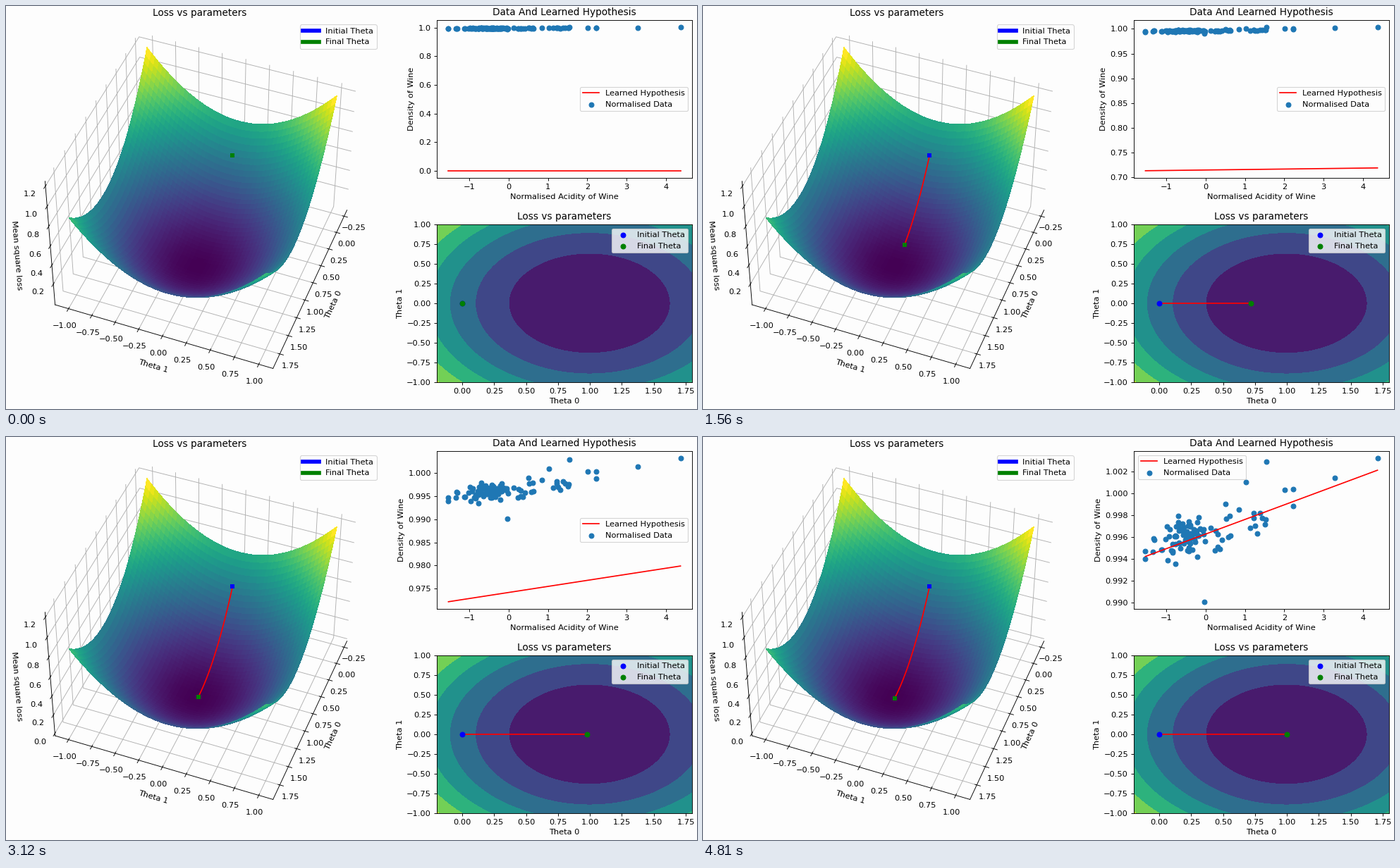
Recreate the animation shown at these times as a matplotlib script. Size 980 px wide and 572 px high, loop 4.94 s.

```python
import numpy as np
import matplotlib.pyplot as plt
from matplotlib.animation import FuncAnimation
from matplotlib.lines import Line2D

W, H = 980, 572
DPI = W / 12
FRAMES, INTERVAL = 38, 130
BEST = np.array([0.99662, 0.00134])  # least squares optimum
RATE = 0.1

plt.rcParams.update({
    "font.family": "DejaVu Sans",
    "figure.facecolor": "#fdfdfd",
    "axes.facecolor": "#fdfdfd",
})


def loss(t0, t1):
    return 0.5 * ((t0 - BEST[0]) ** 2 + (t1 - BEST[1]) ** 2)


def theta(n):
    """Parameters after n steps of gradient descent from the origin."""
    return BEST * (1 - (1 - RATE) ** np.asarray(n, float)[..., None])


def step_count(i):
    """Iterations per frame grow from one to two, then three."""
    return i + max(0, i - 16) + max(0, i - 20)


def make_data():
    """A dense core, a wide spread around the trend and a few outliers."""
    rng = np.random.default_rng(7)
    core = rng.normal(-0.42, 0.27, 56)
    wide = rng.uniform(-1.42, 1.6, 42)
    y_core = 0.9968 + 0.001 * core + rng.normal(0, 0.0008, core.size)
    y_wide = 0.9963 + 0.0011 * wide + rng.normal(0, 0.0013, wide.size)
    far = np.array([(-1.53, 0.9947), (-1.53, 0.994), (-0.03, 0.99005),
                    (1.02, 1.001), (1.55, 1.0029), (2.01, 1.0003),
                    (2.23, 1.0004), (2.23, 0.9988), (3.28, 1.0014),
                    (4.37, 1.0032)])
    y = np.clip(np.r_[y_core, y_wide], 0.9935, 0.9997)
    return np.r_[core, wide, far[:, 0]], np.r_[y, far[:, 1]]


def box(left, top, right, bottom):
    return [left / W, 1 - bottom / H, (right - left) / W, (bottom - top) / H]


def padded(lo, hi, part):
    d = (hi - lo) * part
    return lo - d, hi + d


fig = plt.figure(figsize=((W + 0.01) / DPI, (H + 0.01) / DPI), dpi=DPI)

# Loss surface
ax3 = fig.add_axes(box(17.8, 20.6, 531.2, 534), projection="3d",
                   computed_zorder=False)
g0, g1 = np.meshgrid(np.linspace(-0.2, 1.8, 51), np.linspace(-1, 1, 51))
ax3.plot_surface(g0, g1, loss(g0, g1), cmap="viridis", rstride=1, cstride=1,
                 linewidth=0, antialiased=False, zorder=1)
path3, = ax3.plot([], [], [], color="red", zorder=5)
ax3.plot([0], [0], [loss(0, 0)], "s", color="blue", ms=5, mew=0, zorder=6)
end3, = ax3.plot([], [], [], "s", color="green", ms=5, mew=0, zorder=7)
ax3.view_init(elev=45, azim=21)
ax3.set_xlim(*padded(-0.3, 1.9, 1 / 48))
ax3.set_ylim(*padded(-1.1, 1.1, 1 / 48))
ax3.set_zlim(*padded(0, 1.22, 1 / 48))
ax3.set_xticks(np.arange(-0.25, 1.8, 0.25))
ax3.set_yticks(np.arange(-1, 1.1, 0.25))
ax3.set(xlabel="Theta 0", ylabel="Theta 1", zlabel="Mean square loss")
ax3.set_title("Loss vs parameters", y=1)
ax3.title.set_y(1)  # 3D axes lower their title by default
for axis in (ax3.xaxis, ax3.yaxis, ax3.zaxis):
    axis.set_pane_color((1, 1, 1, 0))
ax3.legend(handles=[Line2D([], [], color="blue", lw=5, label="Initial Theta"),
                    Line2D([], [], color="green", lw=5, label="Final Theta")],
           loc="upper right")

# Data and fitted line
data_x, data_y = make_data()
ends = np.array([data_x.min(), data_x.max()])
axd = fig.add_axes(box(611, 20, 973, 244))
fit, = axd.plot(ends, 0 * ends, color="red", label="Learned Hypothesis")
axd.scatter(data_x, data_y, label="Normalised Data", zorder=1)
axd.set_xlim(*padded(*ends, 0.05))
axd.set(xlabel="Normalised Acidity of Wine", ylabel="Density of Wine")
axd.set_title("Data And Learned Hypothesis", y=1)
legend = axd.legend(loc="center right")

# Contours
axc = fig.add_axes(box(611, 310, 973, 534))
c0, c1 = np.meshgrid(np.linspace(-0.2, 1.8, 201), np.linspace(-1, 1, 201))
axc.contourf(c0, c1, loss(c0, c1), levels=np.arange(8) * 0.2, cmap="viridis")
pathc, = axc.plot([], [], color="red", zorder=2)
axc.scatter([0], [0], color="blue", label="Initial Theta", zorder=3)
endc = axc.scatter([0], [0], color="green", label="Final Theta", zorder=4)
axc.set(xlim=(-0.2, 1.8), ylim=(-1, 1), xlabel="Theta 0", ylabel="Theta 1")
axc.set_xticks(np.arange(0, 1.8, 0.25))
axc.set_title("Loss vs parameters", y=1)
axc.legend(loc="upper right")


def update(i):
    n = step_count(i)
    t0, t1 = theta(np.arange(n + 1)).T
    z = loss(t0, t1)

    path3.set_data_3d(t0, t1, z)
    end3.set_data_3d(t0[-1:], t1[-1:], z[-1:])
    ax3.set_zticks(np.arange(0 if z[-1] < 0.001 else 1, 7) * 0.2)

    pathc.set_data(t0, t1)
    endc.set_offsets([(t0[-1], t1[-1])])

    line = t0[-1] + t1[-1] * ends
    fit.set_ydata(line)
    lo, hi = padded(min(line.min(), data_y.min()),
                    max(line.max(), data_y.max()), 0.05)
    axd.set_ylim(lo, hi)
    # move the legend away once the line reaches it
    clear = (line[1] - lo) / (hi - lo) < 0.41
    legend.set_loc("center right" if clear else "upper left")
    return []


anim = FuncAnimation(fig, update, frames=FRAMES, interval=INTERVAL,
                     repeat=True, repeat_delay=0, blit=False)
plt.show()
```
